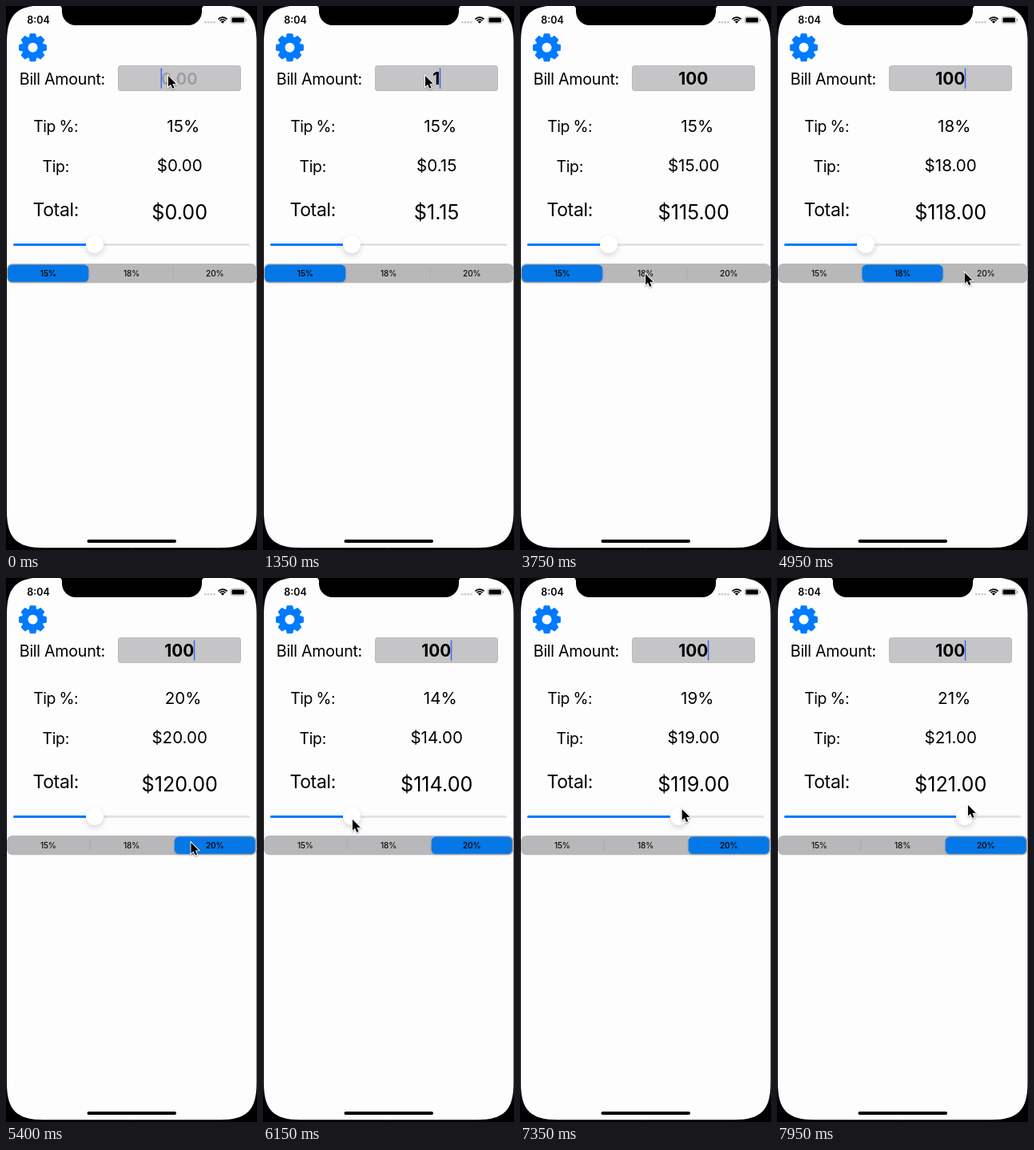
Recreate the animation shown at these times as an HTML page with a canvas. Size 314x678 px, loop 8000 ms.

```html
<!DOCTYPE html>
<html lang="en">
<head>
<meta charset="utf-8">
<title>Tip calculator</title>
<style>
html, body { margin: 0; width: 100%; height: 100%; overflow: hidden; background: #000; }
canvas { display: block; width: 314px; height: 678px; }
</style>
</head>
<body>
<canvas id="stage"></canvas>
<script>
const W = 314, H = 678, LOOP = 8000, STEP = 150;
const BLUE = '#007aff', PAPER = '#fdfdfd';
const canvas = document.getElementById('stage');
const ctx = canvas.getContext('2d');
const scale = window.devicePixelRatio || 1;
canvas.width = W * scale;
canvas.height = H * scale;

const TYPE = 1350, PICK_18 = 4050, PICK_20 = 5100, GRAB = 6150;
const REST = { x: 203, y: 87 };
const MOVES = [
  { from: 2400, to: 3750, x: 157, y: 334 },
  { from: 4200, to: 5100, x: 241, y: 332 },
  { from: 5250, to: 6150, x: 112, y: 301 },
  { from: 6250, to: 7950, x: 239, y: 283 }
];
const SEGMENTS = ['15%', '18%', '20%'];
const SEGMENT_PITCH = 104.2;

const clamp = v => Math.max(0, Math.min(1, v));
const smooth = v => { v = clamp(v); return v * v * (3 - 2 * v); };
const mix = (a, b, k) => a + (b - a) * k;

function pointerAt(t) {
  return MOVES.reduce((p, m) => {
    const k = smooth((t - m.from) / (m.to - m.from));
    return { x: mix(p.x, m.x, k), y: mix(p.y, m.y, k) };
  }, REST);
}

const thumbAt = (t, pointer) => t < GRAB ? 111 : Math.max(111, pointer.x - 4);

function billAt(t) {
  if (t < TYPE) return '';
  return '100'.slice(0, Math.max(1, Math.floor((t - TYPE) / STEP) - 1));
}

function percentAt(t, thumb) {
  if (t < PICK_18) return 15;
  if (t < PICK_20) return 18;
  if (t < GRAB) return 20;
  return Math.floor(mix(10, 25, (thumb - 20) / 274));
}

// The caret blinks once a second and stays lit while typing.
function caretAlpha(t) {
  const resume = 2450;
  if (t >= TYPE && t < resume) return 1;
  const p = (t < TYPE ? t : t - resume) % 1000;
  return p < 420 ? 1 - clamp(p / 130) : clamp((p - 420) / 70);
}

function box(x, y, w, h, r, fill) {
  ctx.beginPath();
  ctx.roundRect(x, y, w, h, r);
  ctx.fillStyle = fill;
  ctx.fill();
}

function disc(x, y, r, fill) {
  ctx.beginPath();
  ctx.arc(x, y, r, 0, 2 * Math.PI);
  ctx.fillStyle = fill;
  ctx.fill();
}

function text(str, x, y, size, { weight = 400, fill = '#000', track = 0 } = {}) {
  ctx.font = `${weight} ${size}px Inter, Roboto, sans-serif`;
  ctx.letterSpacing = track * size + 'px';
  ctx.textAlign = 'center';
  ctx.fillStyle = fill;
  ctx.fillText(str, x, y);
  return ctx.measureText(str).width;
}

function shadow(color, blur, dy) {
  ctx.shadowColor = color;
  ctx.shadowBlur = blur * scale;
  ctx.shadowOffsetY = dy * scale;
}

// One quarter of the screen with a continuous-curvature corner.
function screenCorner(cx, cy, sx, sy, halfW, halfH) {
  const reach = 46, tight = reach * 0.264;
  ctx.save();
  ctx.translate(cx + sx * halfW, cy + sy * halfH);
  ctx.scale(-sx, -sy);
  ctx.beginPath();
  ctx.moveTo(halfW + 0.5, 0);
  ctx.lineTo(reach, 0);
  ctx.bezierCurveTo(tight, 0, 0, tight, 0, reach);
  ctx.lineTo(0, halfH + 0.5);
  ctx.lineTo(halfW + 0.5, halfH + 0.5);
  ctx.fill();
  ctx.restore();
}

function drawPhone() {
  ctx.fillStyle = '#000';
  ctx.fillRect(0, 0, W, H);
  ctx.fillStyle = PAPER;
  for (const sx of [-1, 1]) {
    for (const sy of [-1, 1]) screenCorner(157.25, 337.25, sx, sy, 156.25, 338);
  }
  ctx.beginPath();
  ctx.moveTo(60, -1);
  ctx.arcTo(70, -1, 70, 24, 5);
  ctx.arcTo(70, 24, 157, 24, 17);
  ctx.arcTo(245, 24, 245, -1, 17);
  ctx.arcTo(245, -1, 255, -1, 5);
  ctx.fillStyle = '#000';
  ctx.fill();
  box(101.5, 665, 111.5, 4, 2, '#000');
}

function drawStatus() {
  text('8:04', 40.6, 22, 12.5, { weight: 600 });
  for (let i = 0; i < 4; i++) disc(249.3 + i * 3.7, 20.3, 1.3, '#c6c6c8');

  const fan = r => {
    ctx.beginPath();
    ctx.arc(271, 21.7, r, -Math.PI * 0.76, -Math.PI * 0.24);
  };
  ctx.strokeStyle = ctx.fillStyle = '#000';
  ctx.lineWidth = 1.8;
  for (const r of [7.6, 4.8]) { fan(r); ctx.stroke(); }
  fan(3);
  ctx.lineTo(271, 21.7);
  ctx.fill();

  ctx.beginPath();
  ctx.roundRect(281.2, 13.2, 18, 8.6, 2.5);
  ctx.strokeStyle = '#a5a5a5';
  ctx.lineWidth = 0.8;
  ctx.stroke();
  box(282.5, 14.5, 15.4, 6, 1.3, '#000');
  box(300, 16, 1.2, 3, 0.6, '#a5a5a5');
}

function drawGear() {
  ctx.save();
  ctx.translate(33.5, 51.8);
  ctx.beginPath();
  for (let i = 0; i < 32; i++) {
    const tip = i % 4 === 1 || i % 4 === 2;
    const side = i % 4 < 2 ? -1 : 1;
    const a = Math.floor(i / 4) * Math.PI / 4 + side * (tip ? 0.18 : 0.3);
    const r = tip ? 16.8 : 13;
    ctx.lineTo(r * Math.sin(a), -r * Math.cos(a));
  }
  ctx.closePath();
  ctx.fillStyle = ctx.strokeStyle = BLUE;
  ctx.lineWidth = 1.8;
  ctx.lineJoin = 'round';
  ctx.fill();
  ctx.stroke();
  disc(0, 0, 6, PAPER);
  ctx.restore();
}

function drawField(t, bill) {
  box(140, 74, 154, 32, 4, '#b4b4b6');
  box(140.6, 74.6, 152.8, 30.6, 3.5, '#c5c5c7');
  const mid = 216.8;
  const width = bill
    ? text(bill, mid, 97.7, 20.8, { weight: 700 })
    : text('0.00', mid, 97.7, 20.3, { weight: 600, fill: '#9b9b9e' });
  ctx.globalAlpha = caretAlpha(t);
  box(mid + (bill ? width : -width) / 2 - 0.5, 77.5, 1.5, 25.5, 0.7, '#426bf2');
  ctx.globalAlpha = 1;
}

function drawRows(bill, percent) {
  const amount = Number(bill), tip = amount * percent / 100;
  const money = v => '$' + v.toFixed(2);
  const tight = { track: -0.015 };
  text('Bill Amount:', 70.4, 97.7, 19.7, tight);
  text('Tip %:', 62.2, 157.3, 19.4, { track: -0.03 });
  text('Tip:', 62.2, 206.7, 19.4, tight);
  text('Total:', 62.2, 261.6, 23, tight);
  text(percent + '%', 221.7, 157.3, 20.6);
  text(money(tip), 217.2, 205.7, 20.6);
  text(money(amount + tip), 217.2, 265.5, 25.2);
}

function drawSlider(x) {
  box(9, 296, 296, 3, 1.5, '#e3e3e5');
  box(9, 296, x - 9, 3, 1.5, BLUE);
  ctx.save();
  shadow('rgba(0,0,0,.16)', 7, 3);
  disc(x, 297, 11, '#fff');
  ctx.restore();
}

function drawSegments(t) {
  const slide = at => smooth((t - at + 80) / 300);
  const chosen = (t >= PICK_18) + (t >= PICK_20);
  box(1, 321, 312.5, 24.3, 7, '#b8b8ba');
  for (const i of [1, 2]) {
    const free = chosen !== i && chosen !== i - 1;
    if (free) box(0.4 + i * SEGMENT_PITCH, 326, 0.8, 14, 0, '#a9a9ac');
  }
  ctx.save();
  shadow('rgba(0,0,0,.2)', 3, 1);
  box(2.3 + SEGMENT_PITCH * (slide(PICK_18) + slide(PICK_20)), 322.6, 101, 21.2, 5.5, '#0577e6');
  ctx.restore();
  SEGMENTS.forEach((label, i) => text(label, 52.8 + SEGMENT_PITCH * i, 336.8, 10.1,
    { weight: i === chosen ? 600 : 500, fill: '#0b0b0c', track: -0.02 }));
}

function drawPointer({ x, y }) {
  ctx.save();
  ctx.translate(x, y);
  ctx.scale(0.95, 0.95);
  const arrow = new Path2D('M0 0V14.2L3.2 11.3 5.6 16.7 8 15.7 5.7 10.4 10.2 10.2Z');
  shadow('rgba(0,0,0,.35)', 2, 1);
  ctx.strokeStyle = '#fff';
  ctx.lineWidth = 2;
  ctx.stroke(arrow);
  ctx.shadowColor = 'transparent';
  ctx.fillStyle = '#000';
  ctx.fill(arrow);
  ctx.restore();
}

function draw(t) {
  const pointer = pointerAt(t), thumb = thumbAt(t, pointer), bill = billAt(t);
  ctx.setTransform(scale, 0, 0, scale, 0, 0);
  drawPhone();
  drawStatus();
  drawGear();
  drawField(t, bill);
  drawRows(bill, percentAt(t, thumb));
  drawSlider(thumb);
  drawSegments(t);
  drawPointer(pointer);
}

const start = performance.now();
function tick() {
  const t = (performance.now() - start) % LOOP;
  draw(Math.floor(t / STEP) * STEP);
  requestAnimationFrame(tick);
}
tick();
</script>
</body>
</html>
```
